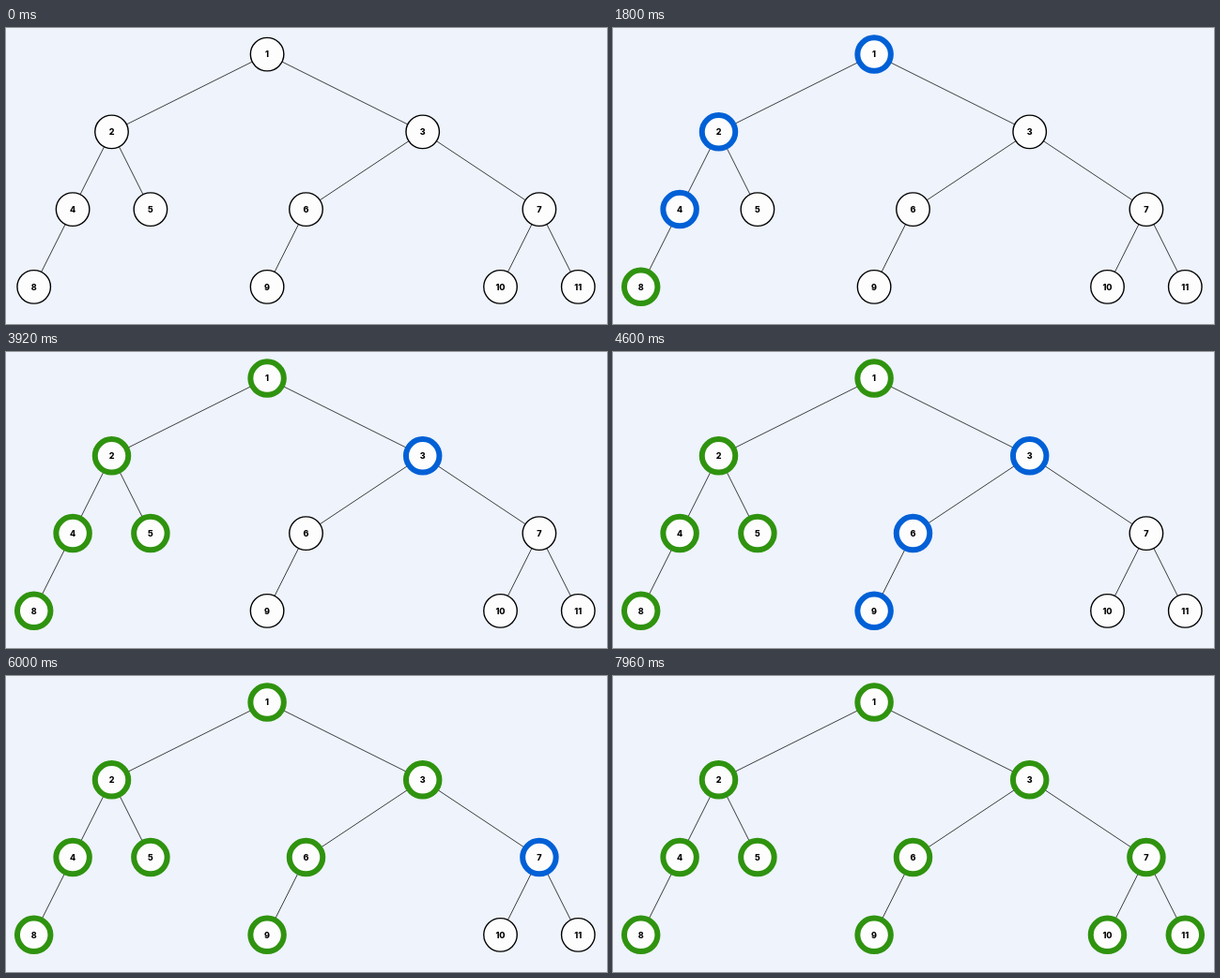
Write an HTML page that moves like this. It is 640x316 px and loops after 7.98 s.

```html
<!DOCTYPE html>
<html lang="en">
<head>
<meta charset="utf-8">
<title>In-order tree traversal</title>
<style>
  html, body { margin: 0; width: 100%; height: 100%; overflow: hidden; background: #eef3fc; }
  svg { display: block; width: 640px; height: 316px; }
  line { stroke: #000; stroke-width: .75; }
  circle { fill: #fdfdfd; stroke: #000; stroke-width: 1.4; }
  text { font: 800 9px Inter, "Liberation Sans", sans-serif; text-anchor: middle; fill: #000; }
</style>
</head>
<body>
<svg viewBox="0 0 640 316"><g id="edges"></g><g id="nodes"></g></svg>
<script>
const LOOP = 7980, START = 120, BEAT = 361, TICK = 20;
const STEP_X = 41.4, STEP_Y = 82.75, RADIUS = 17.75;
const IDLE = { stroke: '#000', strokeWidth: '1.4px' };
const ACTIVE = { stroke: '#0060d6', strokeWidth: '6px' };
const DONE = { stroke: '#2f930f', strokeWidth: '6px' };

const node = (id, left, right, spread = 1) => ({ id, left, right, spread });
const tree = node(1,
  node(2, node(4, node(8)), node(5)),
  node(3, node(6, node(9)), node(7, node(10), node(11)), 3),
  4);

function add(group, tag, attrs) {
  const el = document.createElementNS('http://www.w3.org/2000/svg', tag);
  for (const name in attrs) el.setAttribute(name, attrs[name]);
  return document.getElementById(group).appendChild(el);
}

let beats = 0;
function nextBeat() {
  const time = START + BEAT * beats++;
  return Math.floor(time / TICK) * TICK;
}

// Enter a node, finish its left side, mark it, then go right.
function traverse(item, x, y) {
  const { id, left, right, spread } = item;

  function descend(child, side) {
    if (!child) return;
    const childX = x + side * spread * STEP_X, childY = y + STEP_Y;
    add('edges', 'line', { x1: x, y1: y, x2: childX, y2: childY });
    traverse(child, childX, childY);
  }

  const entered = nextBeat();
  descend(left, -1);
  const visited = nextBeat();
  descend(right, 1);

  const easing = 'steps(1, end)';
  add('nodes', 'circle', { cx: x, cy: y, r: RADIUS }).animate([
    { ...IDLE, offset: 0, easing },
    { ...ACTIVE, offset: entered / LOOP, easing },
    { ...DONE, offset: visited / LOOP, easing },
    { ...DONE, offset: 1 }
  ], { duration: LOOP, iterations: Infinity });
  add('nodes', 'text', { x, y: y + 3.2 }).textContent = id;
}

traverse(tree, 278.1, 28.1);
</script>
</body>
</html>
```
